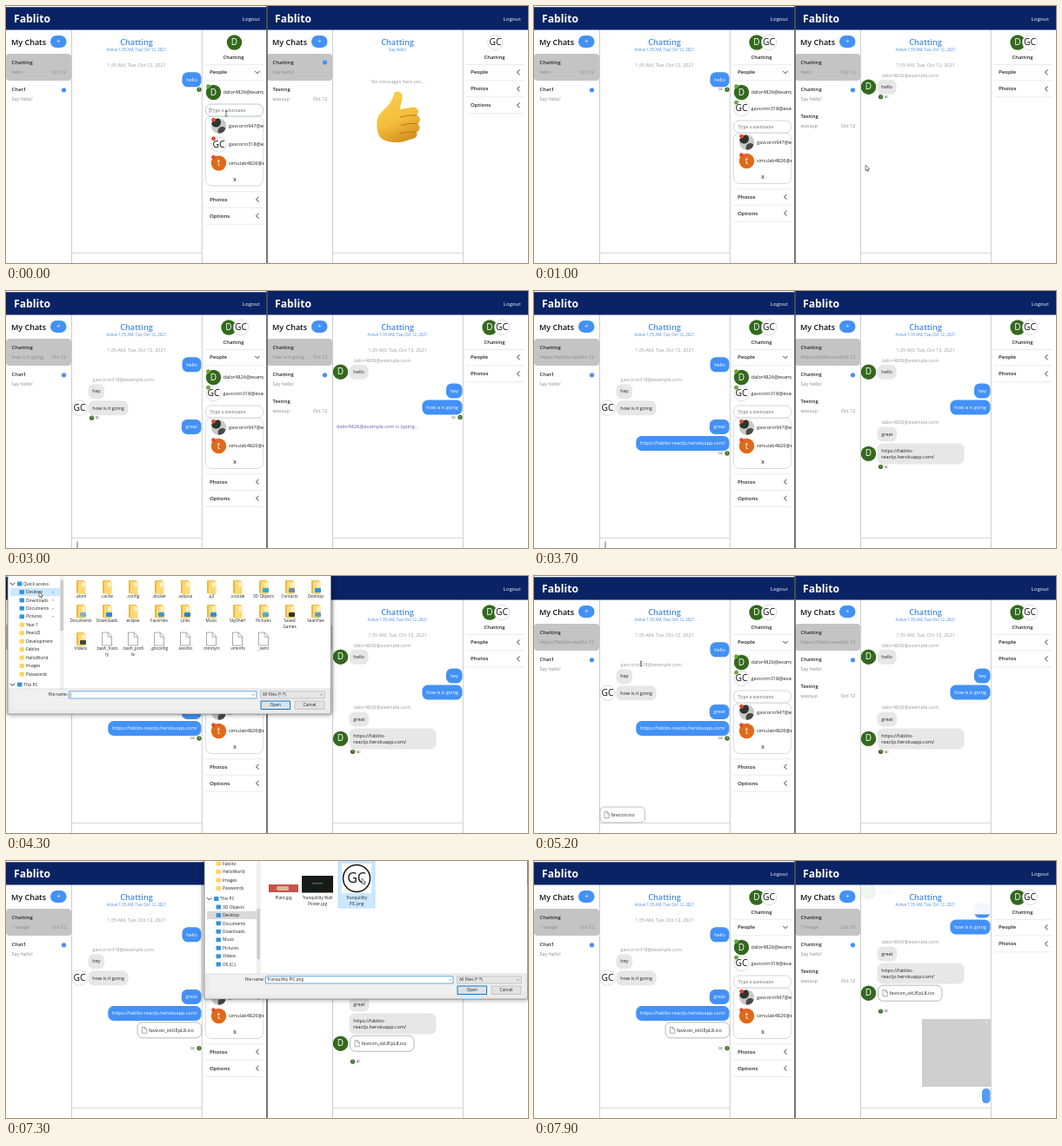
These frames come from a looping animation (600x296 px, 8 s). An HTML page with a canvas:

```html
<!DOCTYPE html>
<html lang="en">
<head>
<meta charset="utf-8">
<title>Two chat windows</title>
<style>
html, body { margin: 0; width: 100%; height: 100%; overflow: hidden; background: #fff; }
canvas { display: block; width: 600px; height: 296px; }
</style>
</head>
<body>
<canvas id="stage"></canvas>
<script>
const canvas = document.getElementById('stage');
const c = canvas.getContext('2d');
const ratio = window.devicePixelRatio || 1;
canvas.width = 600 * ratio;
canvas.height = 296 * ratio;

const LOOP = 8000, JOIN = 500, OPEN_CHAT = 800;
const BLUE = '#4391f7', TITLE = '#4489e8', GREY = '#999', INK = '#222', GREEN = '#33691e', LINE = '#ccc';
const DATE = '1:35 AM, Tue, Oct 12, 2021';
const MAIL = { D: 'dalor4826@example.com', G: 'gavcorin318@example.com' };

const messages = [
  { from: 'D', text: 'hello', at: -1000 },
  { from: 'G', text: 'hey', at: 1500, typed: 1100 },
  { from: 'G', text: 'how is it going', at: 2100, typed: 1700 },
  { from: 'D', text: 'great', at: 2850, typed: 2500 },
  { from: 'D', text: 'https://fablito-reactjs.herokuapp.com/', at: 3500, typed: 3050,
    lines: ['https://fablito-', 'reactjs.herokuapp.com/'] },
  { from: 'D', file: 'favicon_xkUEpL8.ico', at: 5600 },
  { from: 'G', image: true, at: 7600 }
];
const delay = m => m.image ? 900 : 200;

// time, x, y, shape: i = text beam, a = arrow, - = hidden
const pointer = [
  [0, 253, 124, 'i'], [150, 253, 126, 'a'], [400, 262, 160, 'a'], [550, 262, 160, 'a'],
  [780, 330, 70, 'a'], [900, 340, 72, 'a'], [1100, 421, 291, 'i'], [2250, 421, 291, 'i'],
  [2450, 130, 291, 'i'], [2550, 130, 291, '-'], [3750, 90, 291, 'a'], [3900, 95, 290, 'a'],
  [4200, 38, 18, 'a'], [4450, 38, 18, 'a'], [4650, 88, 15, 'a'], [4750, 310, 148, 'a'],
  [4900, 310, 148, 'a'], [5200, 123, 101, 'i'], [5450, 150, 290, 'i'], [5700, 150, 290, 'a'],
  [6400, 400, 290, 'a'], [6600, 400, 270, 'a'], [6950, 409, 20, 'a'], [7300, 409, 20, 'a'],
  [7390, 535, 148, 'a'], [7500, 519, 184, '-'], [8000, 519, 184, '-']
];

function text(s, x, y, size = 5.5, color = INK, weight = 400, align = 'left', face = '"Open Sans", sans-serif') {
  c.font = `${weight} ${size}px ${face}`;
  c.textAlign = align;
  c.textBaseline = 'middle';
  c.fillStyle = color;
  c.fillText(s, x, y + 0.4);
}
function box(x, y, w, h, fill, r = 0, stroke, width = 0.6) {
  c.beginPath();
  c.roundRect(x, y, w, h, r);
  if (fill) { c.fillStyle = fill; c.fill(); }
  if (stroke) { c.strokeStyle = stroke; c.lineWidth = width; c.stroke(); }
}
function dot(x, y, r, fill, stroke) {
  c.beginPath();
  c.arc(x, y, r, 0, 7);
  c.fillStyle = fill;
  c.fill();
  if (stroke) { c.strokeStyle = stroke; c.lineWidth = 0.7; c.stroke(); }
}
function path(points, color, width = 0.8) {
  c.beginPath();
  points.forEach(([x, y]) => c.lineTo(x, y));
  c.strokeStyle = color;
  c.lineWidth = width;
  c.stroke();
}
function clipped(x, y, w, h, draw) {
  c.save();
  c.beginPath();
  c.rect(x, y, w, h);
  c.clip();
  draw();
  c.restore();
}
function textWidth(s) {
  c.font = '400 5.5px "Open Sans", sans-serif';
  return c.measureText(s).width;
}

function avatar(who, x, y, r = 8.7) {
  if (who === 'D' || who === 't') {
    dot(x, y, r, who === 'D' ? GREEN : '#e0691a');
    text(who, x, y, r * 1.15, '#fff', 400, 'center');
  } else if (who === 'G') {
    dot(x, y, r, '#fff', '#ccc');
    text('GC', x, y, r * 1.18, '#111', 400, 'center');
  } else {
    dot(x, y, r, '#c9cac5');
    c.save();
    c.beginPath(); c.arc(x, y, r, 0, 7); c.clip();
    dot(x - 3, y - 4, 5.5, '#30332f');
    dot(x + 4, y + 6, 5, '#474b46');
    c.restore();
  }
}
function pageIcon(x, y, w, h) {
  c.beginPath();
  [[0, 0], [.62, 0], [1, .32], [1, 1], [0, 1]].forEach(([a, b]) => c.lineTo(x + a * w, y + b * h));
  c.closePath();
  c.fillStyle = '#fff'; c.fill();
  c.strokeStyle = '#666'; c.lineWidth = .55; c.stroke();
  path([[x + .6 * w, y], [x + .6 * w, y + .35 * h], [x + w, y + .35 * h]], '#666', .5);
}
function chevron(x, y, down) {
  path(down ? [[x - 2.7, y - 1.4], [x, y + 1.4], [x + 2.7, y - 1.4]]
            : [[x + 1.5, y - 2.8], [x - 1.5, y], [x + 1.5, y + 2.8]], '#222', .9);
}

function thumb() {
  const skin = c.createLinearGradient(438, 100, 462, 157);
  skin.addColorStop(0, '#fad04a');
  skin.addColorStop(.55, '#f3bd3c');
  skin.addColorStop(1, '#d28d20');
  c.fillStyle = skin;
  c.beginPath();
  c.moveTo(446, 101);
  c.bezierCurveTo(448, 97, 455, 98, 455.5, 104);
  c.bezierCurveTo(456, 109, 453, 114, 453, 119);
  c.lineTo(467, 116.5);
  c.bezierCurveTo(474, 116, 476, 123, 472, 125.5);
  c.bezierCurveTo(477, 127, 477, 134, 473, 135.5);
  c.bezierCurveTo(477, 138, 476, 144, 472, 145);
  c.bezierCurveTo(474, 150, 470, 153, 465, 153.5);
  c.bezierCurveTo(453, 159, 438, 158, 431, 152);
  c.bezierCurveTo(425, 146, 425, 129, 430, 124);
  c.bezierCurveTo(437, 117, 444, 111, 446, 101);
  c.fill();
  [[126, 472], [135.5, 473], [145, 471]].forEach(([y, x]) => {
    c.beginPath();
    c.moveTo(x, y);
    c.quadraticCurveTo(x - 10, y - 1, x - 19, y + 2);
    c.strokeStyle = '#b97818'; c.lineWidth = 1; c.stroke();
  });
}

function drawReceipts(me, from, x, y, joined) {
  const mine = me === from;
  if (mine && joined) text('GC', x + 214.5, y, 3.4, INK, 400, 'center');
  if (!mine) text('GC', x + 105, y, 3.4, INK, 400, 'center');
  dot(x + (mine ? 222 : 98.5), y, 2.6, GREEN);
  text('D', x + (mine ? 222 : 98.5), y, 3, '#fff', 400, 'center');
}

function drawMessages(me, ox, t) {
  const shown = messages.filter(m => t >= m.at + (m.from === me ? 0 : delay(m)));
  const seen = messages.filter(m => t >= m.at + delay(m)).pop();
  const scroll = me === 'G' ? 58 * Math.min(1, Math.max(0, (t - 7600) / 150)) : 0;
  let y = 76, previous;
  c.save();
  c.translate(0, -scroll);
  text(DATE, ox + 150, 68.5, 5.5, GREY, 400, 'center');

  shown.forEach((m, i) => {
    const mine = m.from === me, fresh = m.from !== previous;
    if (fresh) y += mine ? (i ? 2.5 : 0) : (i ? 11.8 : 8.5);
    if (fresh && !mine) text(MAIL[m.from], ox + 99.5, y - 4.7, 5.5, GREY);
    const lines = !mine && m.lines || [m.text];
    let h = lines.length > 1 ? 24.3 : 17.4;
    if (m.image) {
      box(ox + 146, 240, 79, 78, '#cfcfcf');
      path([[ox + 216, 242], [ox + 219.5, 243], [ox + 221, 246]], '#e4e4e4', .8);
      box(ox + 215, 320, 9.5, 17, '#529bf7', 4.5);
    } else if (m.file) {
      const x = ox + (mine ? 151 : 95.5);
      box(x, y, 73.5, 18, '#fff', 6, '#888');
      pageIcon(x + 5.5, y + 5.5, 5.3, 7);
      text(m.file, x + 13, y + 9);
      h = 27;
    } else {
      const w = lines.length > 1 ? 100 : textWidth(m.text) + 9.5;
      const x = ox + (mine ? 224.5 - w : 94.5);
      box(x, y + .3, w, h - .4, mine ? BLUE : '#e7e7e7', 6.5);
      lines.forEach((s, n) => text(s, x + 4.8, y + 8.7 + n * 7.3, 5.5, mine ? '#fff' : INK));
    }
    const next = shown[i + 1];
    if (!mine && (!next || next.from !== m.from)) avatar(m.from, ox + 84.5, y + (m.file ? 9 : h / 2));
    y += h;
    if (m === seen) {
      drawReceipts(me, m.from, ox, y + 2.8, t >= JOIN);
      if (next && next.from === m.from) y += 4;
    }
    y += 1.7;
    previous = m.from;
  });

  const typing = messages.find(m => m.from !== me && m.typed && t >= m.typed + 100 && t < m.at + 200);
  if (typing) text(MAIL[typing.from] + ' is typing...', ox + 80, y + 12, 5.6, '#6257ad');
  c.restore();
}

function drawList(ox, rows, selected) {
  text('My Chats', ox + 6, 42, 9, '#111', 600);
  box(ox + 51, 34, 18.5, 14, BLUE, 7);
  text('+', ox + 60.2, 40.6, 8, '#fff', 400, 'center');
  rows.forEach(([name, sub, mark], i) => {
    const y = 55 + 31 * i;
    if (i === selected) box(ox, y, 75, 31, '#c4c4c4', 4);
    text(name, ox + 6.5, y + 10.5, 5.9, INK, 600);
    clipped(ox, y, mark ? 60 : 53.5, 31, () => text(sub, ox + 6.5, y + 21, 5.5, '#888'));
    if (mark) dot(ox + 66.5, y + (i === selected ? 10 : 10.8), 2.6, BLUE);
    else text('Oct 12', ox + 69.5, y + 21, 5.5, '#888', 400, 'right');
  });
}

function section(ox, name, y, down) {
  text(name, ox + 234, y, 6.1, INK, 600);
  chevron(ox + 289, y, down);
  path([[ox + 229, y + 9.5], [ox + 296, y + 9.5]], '#ddd', .6);
}
function person(who, name, x, y, status, label) {
  avatar(who, x, y, 8.7);
  dot(x - 6, y - 6.8, 2.4, status);
  text(name, label, y, 5.6);
}
function drawPanel(ox, t, left) {
  const joined = t >= (left ? JOIN : OPEN_CHAT);
  if (joined) {
    avatar('D', ox + 256, 42);
    avatar('G', ox + 270, 42);
  } else avatar(left ? 'D' : 'G', ox + 262.5, 42);
  text('Chatting', ox + 261.5, 59.5, 5.9, INK, 600, 'center');
  path([[ox + 229, 67.5], [ox + 296, 67.5]], '#ddd', .6);
  section(ox, 'People', 76.3, left);
  if (!left) {
    section(ox, 'Photos', 95.3);
    if (!joined) section(ox, 'Options', 114.3);
    return;
  }
  clipped(226, 86, 70.3, 210, () => {
    person('D', MAIL.D, 238.5, 99.5, '#65a735', 249.5);
    if (joined) person('G', MAIL.G, 238.5, 118, '#65a735', 249.5);
    const top = joined ? 132 : 113;
    const found = [['p', 'gavcorin947@example.com'], ['G', MAIL.G], ['t', 'simulab4826@example.com']]
      .filter(p => !joined || p[0] !== 'G');
    const h = found.length * 21.5 + 15.5;
    box(229.3, top + 14, 66.5, h, '#fff', 7, '#b9c0cb');
    box(229.3, top, 66.5, 14, '#fff', 6.5, joined ? '#bbb' : '#8aa');
    text('Type a username', 234.5, top + 7, 5, '#777', 400, 'left', '"Noto Serif", serif');
    if (!joined) path([[234, top + 4], [234, top + 10]], '#333', .5);
    found.forEach(([who, name], i) => person(who, name, 244.5, top + 25 + i * 21.5, '#e34b32', 256));
    text('X', 263, top + h + 7, 5.5, INK, 600, 'center');
  });
  const y = joined ? 219.8 : 222.8;
  path([[229, y - 9], [296, y - 9]], '#ddd', .6);
  section(0, 'Photos', y);
  section(0, 'Options', y + 19);
}

function drawWindow(me, ox, t) {
  const left = me === 'D', empty = !left && t < OPEN_CHAT;
  const last = messages.filter(m => t >= m.at + delay(m)).pop();
  const summary = last.text || '1 image';
  clipped(ox, 0, 300, 296, () => {
    box(ox, 0, 300, 296, '#fff');
    clipped(ox + 76, 28, 149, 256, () => {
      if (empty) {
        text('No messages here yet...', ox + 150.5, 86.8, 5.5, GREY, 400, 'center');
        thumb();
      } else drawMessages(me, ox, t);
      box(ox + 76, 28, 149, 33.5, 'rgba(255,255,255,.92)');
    });
    text('Chatting', ox + 150, 41.8, 9.2, TITLE, 600, 'center');
    text(empty ? 'Say hello!' : 'Active ' + DATE, ox + 150, 50.3, 4.5, TITLE, 400, 'center');

    let rows = [['Chatting', summary], ['Chat1', 'Say hello!', true]], selected = 0;
    if (!left) {
      rows = [['Chatting', 'Say hello!', true], ['Testing', 'wassup']];
      if (t >= JOIN) rows.unshift(['Chatting', summary]);
      if (t >= JOIN && empty) selected = 1;
    }
    drawList(ox, rows, selected);
    drawPanel(ox, t, left);

    path([[ox + 75.5, 27], [ox + 75.5, 296]], LINE, 1);
    path([[ox + 225.3, 27], [ox + 225.3, 296]], LINE, 1);
    path([[ox + 76, 284.5], [ox + 225, 284.5]], LINE, .8);

    const draft = messages.find(m => m.from === me && m.typed && t >= m.typed && t < m.at);
    const typed = draft ? draft.text.slice(0, Math.ceil(draft.text.length * (t - draft.typed) / (draft.at - draft.typed))) : '';
    text(typed, ox + 82, 292);
    const focused = left ? t >= 2450 && t < 3900 : t >= 1050 && t < 2400;
    if (focused) {
      const x = ox + 82 + textWidth(typed);
      path([[x, 288.5], [x, 296]], '#222', .7);
    }
    if (left && t >= 4900 && t < 5600) {
      box(76, 266, 51.5, 18, '#fff', 5, '#999');
      pageIcon(81, 271.5, 5.3, 7);
      text('favicon.ico', 88.5, 275);
    }
    box(ox, 0, 300, 27.5, '#0a2364');
    if (left) box(0, 0, 300, 1.2, '#fff');
    text('Fablito', ox + 9, 15.9, 12.2, '#fff', 700);
    text('Logout', ox + 271.8, 15.3, 6.1, '#fff');
  });
}

const places = ['Quick access', 'Desktop', 'Downloads', 'Documents', 'Pictures', 'Year 1', 'ReactJS', 'Development',
  'Fablito', 'HelloWorld', 'Images', 'Passwords', 'This PC', '3D Objects', 'Desktop', 'Documents', 'Downloads',
  'Music', 'Pictures', 'Videos', 'OS (C:)'];
const home = ['.atom', '.cache', '.config', '.docker', '.eclipse', '.p2', '.vscode', '3D Objects', 'Contacts', 'Desktop',
  'Documents', 'Downloads', 'eclipse', 'Favorites', 'Links', 'Music', 'SkyShelf', 'Pictures', 'Saved|Games', 'Searches',
  'Videos', '.bash_histo|ry', '.bash_profi|le', '.gitconfig', '.lesshst', '.minttyrc', '.viminfo', '_netrc'];

function folder(x, y, mark) {
  box(x - 5, y - 8, 9, 15, '#e9b94a', 1);
  box(x - 3, y - 7, 8.5, 15, '#ffd975', .7);
  box(x + 1.2, y - 5.5, 3.5, 5, '#fff4ca');
  if (mark) box(x - 1, y + 1, 7, 5, mark, 1);
}
function label(s, x, y) {
  s.split('|').forEach((line, i) => text(line, x, y + i * 6.3, 4.7, INK, 400, 'center'));
}
function drawHome(ox) {
  const marks = { 7: '#35a9d6', 8: '#668fa8', 9: '#2f97dc', 10: '#78b4d8', 11: '#278ce0', 13: '#3b9bd8', 14: '#2d82cf',
    15: '#2c8fe0', 17: '#52a9d8', 18: '#333', 19: '#5f9dc5', 20: '#444' };
  home.forEach((name, i) => {
    const x = ox + 86 + 30 * (i % 10), y = [13, 41, 73][Math.floor(i / 10)];
    if (i > 20) pageIcon(x - 5.5, y - 8, 11, 15);
    else folder(x, y, marks[i]);
    label(name, x, y + 10.7);
  });
}
function drawDesktop(ox, withIcon, picked) {
  if (withIcon) {
    if (picked) box(ox + 67, 0, 38, 54, '#cce8ff', 0, '#99d1ff');
    pageIcon(ox + 80, 16, 13, 18);
    label('favicon.ico', ox + 86, 42.8);
    ox += 42;
  }
  box(ox + 76, 27, 34, 9, '#c6534c');
  box(ox + 85, 29, 14, 5, '#e2b49b', 2);
  label('Plant.jpg', ox + 93, 42.8);
  box(ox + 114, 17, 36, 19.5, '#171b18');
  box(ox + 126, 25, 12, 1.5, '#526052');
  label('Tranquillity Wall|Poster.jpg', ox + 132, 42.8);
  if (picked && !withIcon) box(ox + 156, 0, 42, 54, '#cce8ff', 0, '#99d1ff');
  box(ox + 160, 3, 34, 34, '#fff');
  dot(ox + 177, 20, 15.5, '#fff');
  c.strokeStyle = '#111'; c.lineWidth = 1.5; c.stroke();
  text('GC', ox + 177, 20, 16, '#111', 400, 'center');
  label('Tranquillity|PIC.png', ox + 177, 42.8);
}

function drawDialog(ox, { scroll, active, file, content }) {
  c.save();
  c.shadowColor = 'rgba(0,0,0,.45)';
  c.shadowBlur = 6 * ratio;
  box(ox + 2, -5, 371.5, 164, '#f0f0f0', 0, '#777');
  c.restore();
  box(ox + 3, 0, 370, 130, '#fff');
  clipped(ox + 3, 0, 370, 130, () => {
    content();
    places.forEach((name, i) => {
      const y = 9 + 9.45 * i + (i > 11 ? 2.6 : 0) - scroll;
      const root = i === 0 || i === 12, x = ox + (root ? 13 : 23);
      if (i === active) box(ox + 5, y - 4.7, 57, 9.4, scroll ? '#d9d9d9' : '#cce8ff');
      const blue = root || i < 5 || i > 12;
      box(x - (root ? 0 : 7.5), y - 2.5, 5.5, 5, blue ? '#3197dd' : '#ffd465', .8);
      if (root) chevron(ox + 7.5, y, true);
      text(name, root ? x + 7 : x, y, 4.9);
      if (i > 0 && i < 5) text('✦', ox + 54, y, 3.5, '#888', 400, 'center', '"DejaVu Sans", sans-serif');
    });
    box(ox + 62, 0, 4.5, 130, '#f0f0f0');
    box(ox + 62.3, scroll ? 55 : 5, 3.8, 58, '#cdcdcd');
  });
  path([[ox + 3, 130], [ox + 373, 130]], '#d8d8d8');
  text('File name:', ox + 71, 136.8, 4.7, INK, 400, 'right');
  box(ox + 72.5, 132.8, 215.5, 8.2, '#fff', 0, '#0078d7');
  if (file) text(file, ox + 74, 136.8, 4.7);
  else path([[ox + 74.5, 134.2], [ox + 74.5, 139.5]], '#333', .5);
  path([[ox + 283, 136], [ox + 284.5, 137.5], [ox + 286, 136]], '#555', .5);
  box(ox + 292.5, 132.8, 74, 8.2, '#e5e5e5', 0, '#aaa');
  text('All Files (*.*)', ox + 295, 136.8, 4.7);
  path([[ox + 361, 136], [ox + 362.5, 137.5], [ox + 364, 136]], '#555', .5);
  box(ox + 293, 144, 33.5, 9.5, '#e1e1e1', 0, '#0078d7', 1);
  text('Open', ox + 309.7, 148.6, 4.8, INK, 400, 'center');
  box(ox + 332, 144, 34, 9.5, '#e1e1e1', 0, '#adadad');
  text('Cancel', ox + 349, 148.6, 4.8, INK, 400, 'center');
}

function drawPointer(t) {
  const i = pointer.findIndex(p => p[0] > t);
  const [t0, x0, y0, shape] = pointer[i - 1], [t1, x1, y1] = pointer[i];
  const k = (t - t0) / (t1 - t0), e = k * k * (3 - 2 * k);
  const x = x0 + (x1 - x0) * e, y = y0 + (y1 - y0) * e;
  if (shape === 'i') {
    path([[x, y - 2.8], [x, y + 2.8]], '#222', .7);
    path([[x - 1.3, y - 2.8], [x + 1.3, y - 2.8]], '#222', .6);
    path([[x - 1.3, y + 2.8], [x + 1.3, y + 2.8]], '#222', .6);
  } else if (shape === 'a') {
    c.beginPath();
    [[0, 0], [0, 6.5], [1.5, 5.2], [2.6, 7.5], [3.5, 7], [2.5, 4.8], [4.5, 4.7]].forEach(([a, b]) => c.lineTo(x + a, y + b));
    c.closePath();
    c.fillStyle = '#fff'; c.fill();
    c.strokeStyle = '#222'; c.lineWidth = .6; c.stroke();
  }
}

function draw(now) {
  const t = now % LOOP;
  c.setTransform(ratio, 0, 0, ratio, 0, 0);
  drawWindow('D', 0, t);
  drawWindow('G', 300, t);
  box(299.2, 0, 1.6, 296, '#555');
  if (t >= 3900 && t < 4850) {
    const picked = t >= 4650;
    drawDialog(0, { scroll: 0, active: 1, file: picked && 'favicon.ico',
      content: () => t < 4450 ? drawHome(0) : drawDesktop(0, true, picked) });
  }
  if (t >= 6550 && t < 7390) {
    const picked = t >= 6950;
    drawDialog(226, { scroll: 81.5, active: 14, file: picked && 'Tranquillity PIC.png',
      content: () => drawDesktop(226, false, picked) });
  }
  drawPointer(t);
  requestAnimationFrame(frame);
}
const start = performance.now();
function frame() { draw(performance.now() - start); }
frame();
</script>
</body>
</html>
```
